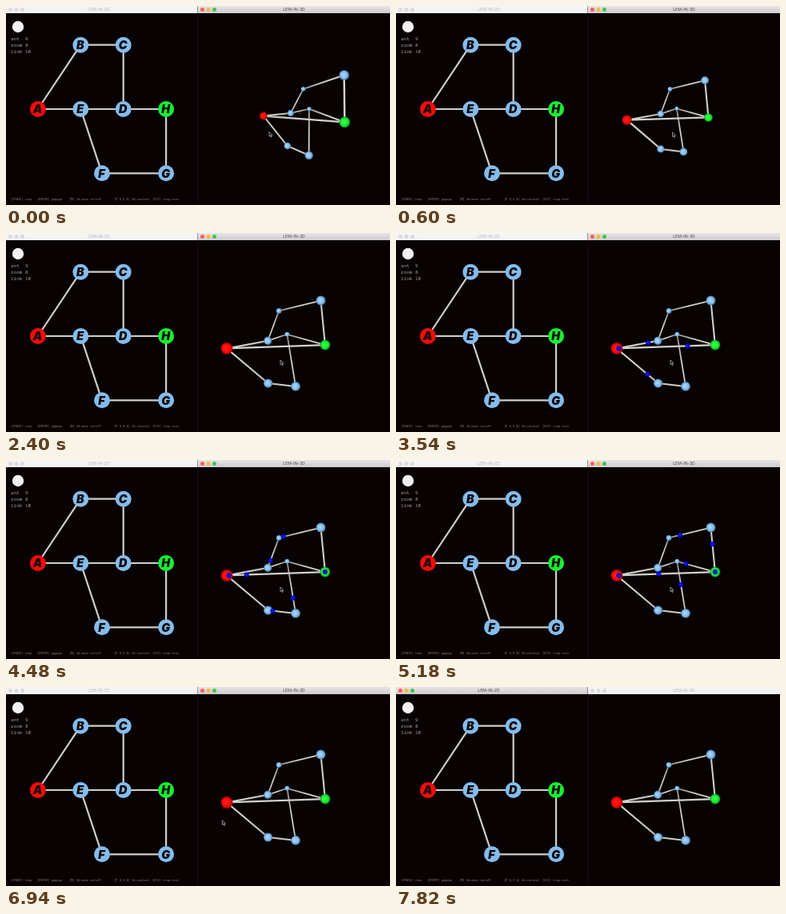
Recreate the animation shown at these times as an HTML page with a canvas. Size 480 px wide and 249 px high, loop 8000 ms.

```html
<!DOCTYPE html>
<html lang="en">
<head>
<meta charset="utf-8">
<title>Ant farm</title>
<style>
html, body { margin: 0; width: 100%; height: 100%; overflow: hidden; background: #090203; }
canvas { display: block; width: 480px; height: 249px; }
</style>
</head>
<body>
<canvas id="stage"></canvas>
<script>
const LOOP = 8000;
const canvas = document.getElementById('stage');
const ctx = canvas.getContext('2d');
const dpr = window.devicePixelRatio || 1;
canvas.width = 480 * dpr;
canvas.height = 249 * dpr;

const MONO = '"Noto Sans Mono", monospace';

// One graph for both windows: column, row, depth
const rooms = {
  D: [0.5, 0, 1.24], F: [0, -1, 1.51], E: [-0.5, 0, 0.055], B: [-0.5, 1, -0.72],
  C: [0.5, 1, -0.8], G: [1.5, -1, 0.37], H: [1.5, 0, -0.31], A: [-1.5, 0, -0.52]
};
const links = ['ED', 'EF', 'FG', 'DH', 'AE', 'CD', 'GH', 'BC', 'AB', 'AH'];
const routes = ['AH', 'AEFGH', 'ABCDH'];

// Light, middle and dark tone of each ball
const tones = {
  blue: ['#aedaff', '#84bcec', '#447298'],
  red: ['#ff2018', '#f80a08', '#a00000'],
  green: ['#44ff50', '#16f030', '#07931a'],
  ant: ['#2020ff', '#0606f4', '#0000a8']
};
const hue = id => id === 'A' ? 'red' : id === 'H' ? 'green' : 'blue';

const lerp = (a, b, u) => a + (b - a) * u;
const mix = (a, b, u) => a.map((v, i) => lerp(v, b[i], u));
const ramp = (t, from, to) => Math.max(0, Math.min(1, (t - from) / (to - from)));

function disc(x, y, r, fill) {
  ctx.fillStyle = fill;
  ctx.beginPath();
  ctx.arc(x, y, r, 0, 7);
  ctx.fill();
}

function line(a, b, width, stroke) {
  ctx.lineWidth = width;
  ctx.strokeStyle = stroke;
  ctx.beginPath();
  ctx.moveTo(a[0], a[1]);
  ctx.lineTo(b[0], b[1]);
  ctx.stroke();
}

function text(str, x, y, font, fill, align = 'left') {
  ctx.font = font;
  ctx.fillStyle = fill;
  ctx.textAlign = align;
  ctx.fillText(str, x, y);
}

function fade(x0, y0, x1, y1, colors) {
  const g = ctx.createLinearGradient(x0, y0, x1, y1);
  colors.forEach((c, i) => g.addColorStop(i / (colors.length - 1), c));
  return g;
}

function ball(x, y, r, tone) {
  const g = ctx.createRadialGradient(x - r * 0.2, y - r * 0.1, 0, x, y, r);
  tones[tone].forEach((c, i) => g.addColorStop([0, 0.65, 1][i], c));
  disc(x, y, r, g);
}

function titleBar(x, width, center, title, active) {
  ctx.fillStyle = fade(0, 0, 0, 9, active ? ['#e6e4e6', '#cfcccf'] : ['#f7f6f7', '#f2f1f2']);
  ctx.fillRect(x, 0, width, 9);
  ['#fc5b57', '#f5bb3b', '#38c84a'].forEach((c, i) =>
    disc(x + 5.5 + i * 7.5, 4.5, 2.5, active ? c : '#dcdadc'));
  text(title, center, 6.4, '5.2px Inter, sans-serif', active ? '#454345' : '#b4b2b4', 'center');
}

function drawFlat() {
  const place = id => [120 + rooms[id][0] * 53.4, 129 - rooms[id][1] * 80.3];
  for (const [a, b] of links) line(place(a), place(b), 2.2, '#d0cecb');
  for (const id in rooms) {
    const [x, y] = place(id);
    disc(x, y, 10, tones[hue(id)][1]);
    text(id, x - 0.5, y + 5.2, 'italic 900 14.5px Inter, sans-serif', '#080406', 'center');
  }
  disc(15, 26, 7.2, '#f2f0f0');
  ['ant  9', 'room 8', 'link 10'].forEach((s, i) =>
    text(s, 6, 43 + i * 7.8, '6px ' + MONO, '#a5a1a1'));
  const help = { 6: '[SPACE] step', 39: '[ENTER] gogogo', 79: '[M] 3d-move on/off',
    135: '[P U,O &] 3d-control', 183: '[ESC] stop-text' };
  for (const x in help) text(help[x], +x, 242.7, '3.7px ' + MONO, '#8a8585');
}

// Dragging turns and shifts the model, then it is zoomed in by stages
function cameraAt(t) {
  const drag = ramp(t, 120, 620);
  return {
    x: lerp(367, 342.3, drag),
    yaw: lerp(0.22, 0, drag),
    unit: 25.7 + 1.1 * ramp(t, 800, 820) + 2 * ramp(t, 1200, 1540) + 2.2 * ramp(t, 1800, 2400)
  };
}

function project([col, row, depth], cam) {
  const PITCH = 0.4, EYE = 1.6;
  const x0 = col + 0.06 * row, y0 = 1.4 * row;
  const x = x0 * Math.cos(cam.yaw) + depth * Math.sin(cam.yaw);
  const z = depth * Math.cos(cam.yaw) - x0 * Math.sin(cam.yaw);
  const y = y0 * Math.cos(PITCH) - z * Math.sin(PITCH);
  const near = EYE / (EYE + z * Math.cos(PITCH) + y0 * Math.sin(PITCH));
  const scale = cam.unit * near;
  return [cam.x + x * scale, 135.5 + y * scale, scale * 0.168, near];
}

function drawAnts(t, cam) {
  const STEP = 596, PAUSE = 0.17;
  const turn = (t - 3100) / STEP;
  const whole = Math.floor(turn);
  const u = ramp(turn - whole, PAUSE, 1);
  const ant = (p, dx = 0) => {
    const [x, y] = project(p, cam);
    ball(x + dx, y, 3, 'ant');
  };
  if (whole < 4) ant(rooms.A, 2.5);
  if (whole >= 1) ant(rooms.H);
  for (const route of routes) {
    const waves = route === 'AH' ? 5 : 2;
    for (let w = 0; w < waves; w++) {
      const from = rooms[route[whole - w]], to = rooms[route[whole - w + 1]];
      if (from && to) ant(mix(from, to, u));
    }
  }
}

function drawSpace(t) {
  const cam = cameraAt(t);
  const spot = id => project(rooms[id], cam);
  const gray = near => {
    const v = Math.min(215, 70 + 115 * near);
    return `rgb(${v}, ${v}, ${v - 5})`;
  };
  for (const [a, b] of links) {
    const p = spot(a), q = spot(b);
    const shade = fade(p[0], p[1], q[0], q[1], [gray(p[3]), '#cfd0ca', gray(q[3])]);
    line(p, q, 0.9 + 0.5 * (p[3] + q[3]), shade);
  }
  disc(cam.x, 134, 0.6, '#b5b8b5');
  for (const id in rooms) {
    const [x, y, r] = spot(id);
    ball(x, y, r, hue(id));
  }
  if (t >= 3140 && t < 6110) drawAnts(t, cam);
}

function drawCursor(t) {
  let p = mix([329, 157.5], [345.5, 158], ramp(t, 120, 600));
  p = mix(p, [343, 159], ramp(t, 1200, 2400));
  p = mix(p, [186, 176], ramp(t, 6580, 7360));
  const [x, y] = mix(p, [92, 250], ramp(t, 7380, 7800));
  ctx.beginPath();
  [[0, 0], [0, 5.6], [1.3, 4.4], [2.3, 6.6], [3.2, 6.2], [2.3, 4.1], [4, 4]]
    .forEach(([dx, dy]) => ctx.lineTo(x + dx, y + dy));
  ctx.closePath();
  ctx.fillStyle = '#080506';
  ctx.fill();
  ctx.lineWidth = 0.7;
  ctx.strokeStyle = '#c8c6c6';
  ctx.stroke();
}

function draw(now) {
  const t = now % LOOP;
  ctx.setTransform(dpr, 0, 0, dpr, 0, 0);
  ctx.fillStyle = '#090203';
  ctx.fillRect(0, 0, 480, 249);
  drawFlat();
  drawSpace(t);
  line([240, 9], [240, 249], 0.7, '#1d1819');
  const leftActive = t >= 7300;
  titleBar(0, 239.6, 116, 'LEM-IN-2D', leftActive);
  titleBar(240, 240, 360, 'LEM-IN-3D', !leftActive);
  drawCursor(t);
  requestAnimationFrame(draw);
}
requestAnimationFrame(draw);
</script>
</body>
</html>
```
